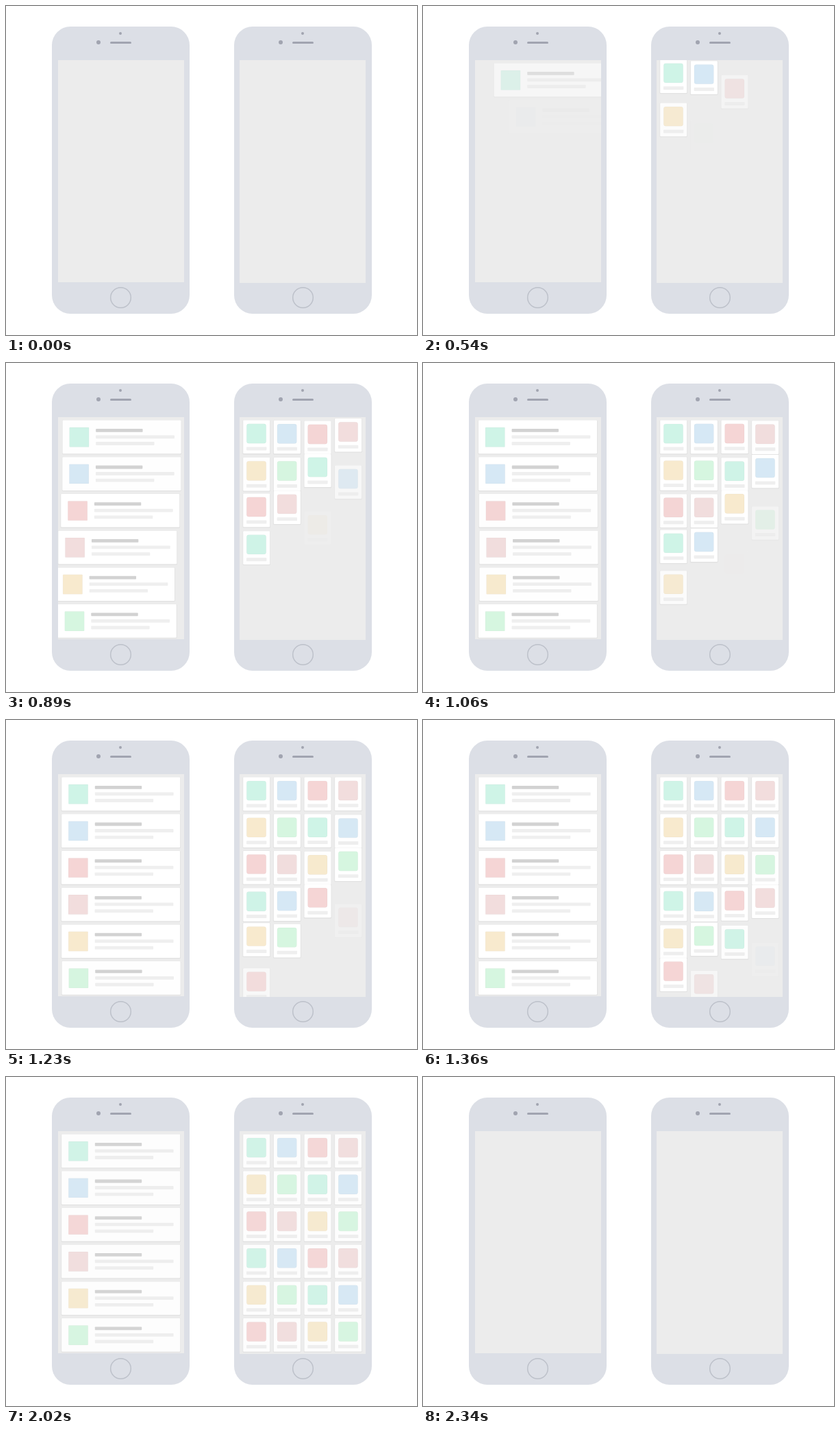
Recreate the animation shown at these times as an HTML page. Size 600x480 px, loop 2.38 s.

```html
<!DOCTYPE html>
<html lang="en">
<head>
<meta charset="utf-8">
<title>Staggered cards</title>
<style>
  html, body { margin: 0; width: 100%; height: 100%; overflow: hidden; background: #fff; }
  svg { display: block; width: 600px; height: 480px; }
</style>
</head>
<body>
<svg id="stage" viewBox="0 0 600 480" xmlns="http://www.w3.org/2000/svg">
  <defs>
    <clipPath id="clipLeft"><rect x="76" y="79" width="184" height="324"/></clipPath>
    <clipPath id="clipRight"><rect x="341" y="79" width="184" height="325"/></clipPath>
  </defs>
</svg>
<script>
const LOOP = 2380;
const FADE_START = 1990, FADE_END = 2340;
const TOP = 83.6, PITCH_Y = 53.7, PITCH_X = 44.65, CARD_H = 48.6;
const COLORS = ['#cff4e7', '#d6e8f5', '#f5d5d5', '#f2dddd', '#f8eace', '#d6f6e0'];
const LIST = { start: 465, stagger: 53, distance: 48, half: 203 };
const GRID = { start: 335, stagger: 47.5, distance: 30, half: 200 };

const stage = document.getElementById('stage');

function add(parent, tag, attrs) {
  const node = document.createElementNS('http://www.w3.org/2000/svg', tag);
  for (const key in attrs) node.setAttribute(key, attrs[key]);
  return parent.appendChild(node);
}

function box(parent, x, y, width, height, fill, rx = 0, more = {}) {
  return add(parent, 'rect', { x, y, width, height, fill, rx, ...more });
}

function phone(x, screenX, screenH) {
  const ink = '#a1a4b0';
  box(stage, x, 30, 201, 419, '#dcdfe6', 27);
  box(stage, screenX, 79, 184, screenH, '#ececec');
  add(stage, 'circle', { cx: x + 100, cy: 40, r: 2, fill: ink });
  add(stage, 'circle', { cx: x + 68, cy: 53, r: 3, fill: ink });
  box(stage, x + 85, 52, 31, 3, ink, 1.5);
  add(stage, 'circle', {
    cx: x + 100.5, cy: 425.5, r: 14.8, fill: 'none', stroke: '#bdc1ca', 'stroke-width': 1.5
  });
}

function card(parent, x, y, width) {
  const group = add(parent, 'g', { opacity: 0 });
  box(group, x - 0.8, y - 0.3, width + 1.6, CARD_H + 1.6, '#000', 1.5, { 'fill-opacity': 0.045 });
  box(group, x, y, width, CARD_H, '#fff', 1);
  return group;
}

function picture(group, x, y, color, rx) {
  box(group, x + 0.5, y + 0.5, 28.4, 28.4, color, rx, { stroke: '#000', 'stroke-opacity': 0.025 });
}

function listRow(parent, i) {
  const y = TOP + i * PITCH_Y;
  const group = card(parent, 81.2, y, 173);
  picture(group, 90.8, y + 9.9, COLORS[i], 0.5);
  box(group, 129.8, y + 12.3, 68.4, 4.8, '#d2d2d2', 0.8);
  box(group, 129.8, y + 21.8, 114.8, 4.8, '#efefef', 0.8);
  box(group, 129.8, y + 31.5, 85.4, 4.8, '#efefef', 0.8);
  return group;
}

function gridTile(parent, row, col) {
  const x = 346.2 + col * PITCH_X, y = TOP + row * PITCH_Y;
  const group = card(parent, x, y, 39);
  picture(group, x + 4.6, y + 4.8, COLORS[(row * 4 + col) % 6], 3);
  box(group, x + 4.8, y + 38.9, 29.4, 5, '#efefef', 0.8);
  return group;
}

phone(67, 76, 324);
phone(333, 341, 325);
const left = add(stage, 'g', { 'clip-path': 'url(#clipLeft)' });
const right = add(stage, 'g', { 'clip-path': 'url(#clipRight)' });

const rows = COLORS.map((_, i) => listRow(left, i));
const tiles = [];
for (let row = 0; row < 6; row++) {
  for (let col = 0; col < 4; col++) tiles.push({ row, col, node: gridTile(right, row, col) });
}
// Tiles enter diagonal by diagonal, each from its upper right end.
tiles.sort((a, b) => a.row + a.col - b.row - b.col || a.row - b.row);

// Damped spring from 1 to 0; "half" is the time to the first overshoot peak.
function spring(t, half) {
  if (t <= 0) return 1;
  const damping = 0.557, angle = Math.PI * t / half;
  return Math.exp(-damping * angle) * (Math.cos(angle) + damping * Math.sin(angle));
}

function place(node, index, time, motion, vertical) {
  const left = spring(time - motion.start - index * motion.stagger, motion.half);
  const shift = (left * motion.distance).toFixed(2);
  node.setAttribute('transform', vertical ? `translate(0 ${shift})` : `translate(${shift} 0)`);
  const fade = Math.min(1, Math.max(0, (FADE_END - time) / (FADE_END - FADE_START)));
  node.setAttribute('opacity', (Math.min(1, 1 - left) * fade).toFixed(3));
}

function draw(time) {
  rows.forEach((node, i) => place(node, i, time, LIST, false));
  tiles.forEach((tile, i) => place(tile.node, i, time, GRID, true));
}

const began = performance.now();
function tick() {
  draw((performance.now() - began) % LOOP);
  requestAnimationFrame(tick);
}
tick();
</script>
</body>
</html>
```
